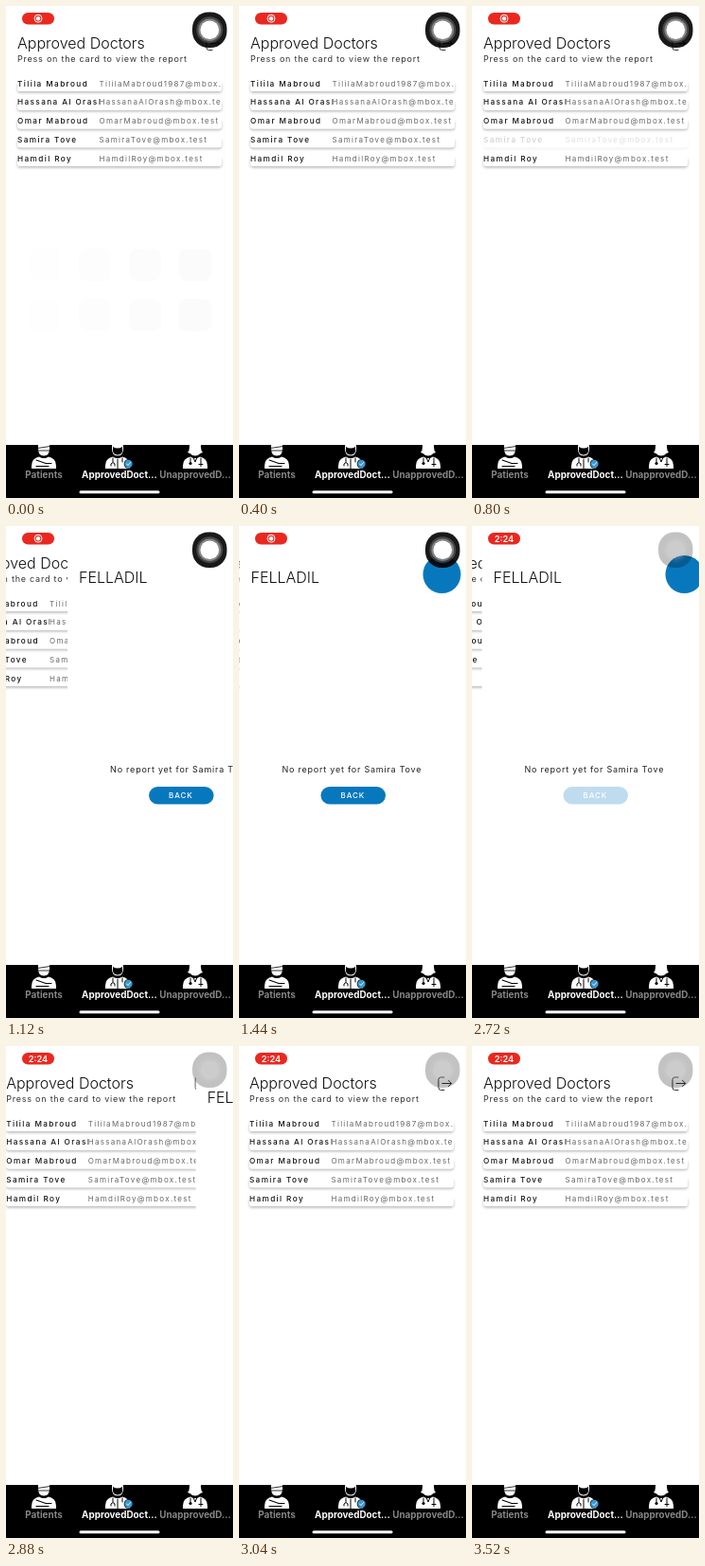
An HTML page with a canvas that plays this animation: 240 px wide and 519 px high, repeating every 3600 ms.

```html
<!DOCTYPE html>
<html lang="en">
<head>
<meta charset="utf-8">
<style>
  html, body { margin: 0; width: 100%; height: 100%; overflow: hidden; background: #fff; }
  canvas { display: block; width: 240px; height: 519px; }
</style>
</head>
<body>
<canvas id="stage"></canvas>
<script>
const W = 240, H = 519, LOOP = 3600, TABS_TOP = 463;
const PUSH = 980, POP = 2703, PARALLAX = 72;
const FONT = 'Inter, "Liberation Sans", sans-serif';
const canvas = document.getElementById('stage');
const ctx = canvas.getContext('2d');
const ratio = window.devicePixelRatio || 1;
canvas.width = W * ratio;
canvas.height = H * ratio;

const doctors = [
  ['Tilila Mabroud', 'TililaMabroud1987@mbox.test'],
  ['Hassana Al Orash', 'HassanaAlOrash@mbox.test'],
  ['Omar Mabroud', 'OmarMabroud@mbox.test'],
  ['Samira Tove', 'SamiraTove@mbox.test'],
  ['Hamdil Roy', 'HamdilRoy@mbox.test']
];
const PRESSED = 3;

const mix = (a, b, p) => a + (b - a) * p;
function ramp(t, from, to) {
  const p = Math.min(1, Math.max(0, (t - from) / (to - from)));
  return p * p * (3 - 2 * p);
}
// Critically damped spring from 0 to 1, as in a native screen transition.
function settle(ms) {
  if (ms <= 0) return 0;
  const x = ms * 0.0183;
  return 1 - (1 + x) * Math.exp(-x);
}

function at(x, y, draw) {
  ctx.save();
  ctx.translate(x, y);
  draw();
  ctx.restore();
}
function faded(alpha, draw) {
  ctx.save();
  ctx.globalAlpha *= alpha;
  draw();
  ctx.restore();
}
function text(str, x, y, size, { weight = 400, color = '#111', spacing = 0, align = 'left' } = {}) {
  ctx.font = `${weight} ${size}px ${FONT}`;
  ctx.letterSpacing = spacing + 'px';
  ctx.textAlign = align;
  ctx.fillStyle = color;
  ctx.fillText(str, x, y);
}
function box(x, y, w, h, r, color) {
  ctx.fillStyle = color;
  ctx.beginPath();
  ctx.roundRect(x, y, w, h, r);
  ctx.fill();
}
function disc(x, y, r, color) {
  ctx.fillStyle = color;
  ctx.beginPath();
  ctx.arc(x, y, r, 0, Math.PI * 2);
  ctx.fill();
}
function line(d, color, width) {
  ctx.strokeStyle = color;
  ctx.lineWidth = width;
  ctx.lineCap = ctx.lineJoin = 'round';
  ctx.stroke(new Path2D(d));
}
function shape(d, color) {
  ctx.fillStyle = color;
  ctx.fill(new Path2D(d));
}

function clippedText(str, x, right, y, size, style) {
  ctx.save();
  ctx.beginPath();
  ctx.rect(x, y - 12, right - x, 18);
  ctx.clip();
  text(str, x, y, size, style);
  ctx.restore();
}

function drawCard([name, mail], y) {
  ctx.save();
  ctx.shadowColor = 'rgba(20,10,30,.3)';
  ctx.shadowBlur = 3 * ratio;
  ctx.shadowOffsetY = 1.6 * ratio;
  box(12, y - 2, 216, 10, 3, '#fff');
  ctx.restore();
  box(12, y - 7, 216, 15, 3, '#fff');
  clippedText(name, 12, 98.5, y + 2.7, 8.2, { weight: 500, spacing: 1.4 });
  clippedText(mail, 98.5, 228, y + 2.7, 8, { color: '#666', spacing: 1.3 });
}

function drawList(t) {
  box(0, 0, W, TABS_TOP, 0, '#fff');
  const ghost = 1 - ramp(t, 0, 450);
  for (let i = 0; i < 8; i++) {
    const column = i % 4;
    faded(0.004 * (column + 1) * ghost, () => {
      box(24 + column * 53, 256 + (i >> 2) * 53, 34, 34, 8, '#301040');
    });
  }
  text('Approved Doctors', 12, 45, 16, { weight: 300, spacing: 0 });
  text('Press on the card to view the report', 12, 59, 9, { color: '#333', spacing: 0.77 });
  const press = ramp(t, 600, 750) - ramp(t, 900, 1100);
  doctors.forEach((doctor, i) => {
    const y = 82 + i * 19.75;
    drawCard(doctor, y);
    if (i === PRESSED) faded(0.8 * press, () => box(8, y - 7, 224, 20, 0, '#fff'));
  });
  line('M218 33H214.5Q212 33 212 35.5V43.5Q212 46.5 214.5 46.5H218M216 39.5H225.5M222.5 36.3L225.7 39.5L222.5 42.7', '#333', 1);
}

function drawReport(t) {
  box(0, 0, W, TABS_TOP, 0, '#fff');
  text('FELLADIL', 12, 60, 16, { weight: 300 });
  disc(214, 51, 20, '#0878be');
  text('No report yet for ' + doctors[PRESSED][0], 45, 260, 9, { color: '#222', spacing: 0.77 });
  faded(1 - 0.74 * ramp(t, 2480, 2630), () => box(86, 275, 68.5, 18.5, 9.25, '#0878be'));
  text('BACK', 107, 287.3, 8, { weight: 500, color: '#fff', spacing: 0.9 });
}

function drawPerson(x, drawDetails) {
  at(x, TABS_TOP, () => {
    shape('M-13 25V22Q-13 14 -5 12.5Q0 15.5 5 12.5Q13 14 13 22V25Z', '#fff');
    shape('M-6 0H6V4Q6 11.5 0 11.5Q-6 11.5 -6 4Z', '#fff');
    drawDetails();
  });
}

function drawTabs() {
  box(0, TABS_TOP, W, H - TABS_TOP, 0, '#000');
  drawPerson(40, () => {
    line('M-7 3.5L6.5 1.5M-7 6H7', '#000', 0.8);
    line('M-8 16L2 19.5H8M-8 22.5H5', '#000', 1.1);
  });
  drawPerson(118, () => {
    shape('M-5 2Q0 5 5 2V6Q5 10 0 10.5Q-5 10 -5 6Z', '#000');
    line('M-5 14V18M-7 22V20Q-5 17 -3 20V22M5 14V18M0 15V25', '#000', 1);
    disc(11.5, 20, 4.8, '#000');
    disc(11.5, 20, 4.2, '#3798d0');
    line('M9.5 20L11 21.6L13.6 18.4', '#d8f4e8', 1);
  });
  drawPerson(200, () => {
    shape('M-8 8Q-6 6 -6 2L6 2Q6 6 8 8L3 10H-3Z', '#fff');
    line('M-5 14V18M6 14V18M-2 13L0 18L2 13', '#000', 1);
    disc(-5, 19.5, 1.6, '#000');
    line('M4 20.5H8M6 18.5V22.5', '#000', 1);
  });
  const label = (str, x, color) => text(str, x, 498, 9.9, { weight: 700, color, align: 'center' });
  label('Patients', 40, '#868686');
  label('ApprovedDoct...', 120, '#fff');
  label('UnapprovedD...', 200, '#868686');
  box(77.5, 511.2, 85, 3, 1.5, '#fff');
}

function drawRecordingPill(t) {
  const clock = ramp(t, 2330, 2530);
  box(17, 7, 34, 12.5, 6.25, '#ea2820');
  faded(1 - clock, () => {
    ctx.strokeStyle = '#fff';
    ctx.lineWidth = 1;
    ctx.beginPath();
    ctx.arc(34, 13.2, 4, 0, Math.PI * 2);
    ctx.stroke();
    disc(34, 13.2, 2.2, '#fff');
  });
  faded(clock, () => text('2:24', 34, 16.6, 9.2, { weight: 600, color: '#fff', align: 'center' }));
}

function drawTouchButton(t) {
  const idle = ramp(t, 1720, 2060);
  const layer = (active, rest, draw) => faded(mix(active, rest, idle), draw);
  layer(0.9, 0.24, () => box(197, 6.5, 36.5, 37.5, 17, '#000'));
  layer(0.2, 0.04, () => disc(215.3, 25.2, 14, '#fff'));
  layer(0.35, 0.05, () => disc(215.3, 25.2, 11.8, '#fff'));
  layer(1, 0.1, () => disc(215.3, 25.2, 9.8, '#fff'));
}

function render(now) {
  const t = now % LOOP;
  const cover = settle(t - PUSH) - settle(t - POP);
  ctx.setTransform(ratio, 0, 0, ratio, 0, 0);
  box(0, 0, W, H, 0, '#fff');
  at(-PARALLAX * cover, 0, () => drawList(t));
  if (cover > 0) at(W * (1 - cover), 0, () => drawReport(t));
  drawTabs();
  drawTouchButton(t);
  drawRecordingPill(t);
}

const start = performance.now();
function tick() {
  render(performance.now() - start);
  requestAnimationFrame(tick);
}
tick();
</script>
</body>
</html>
```
